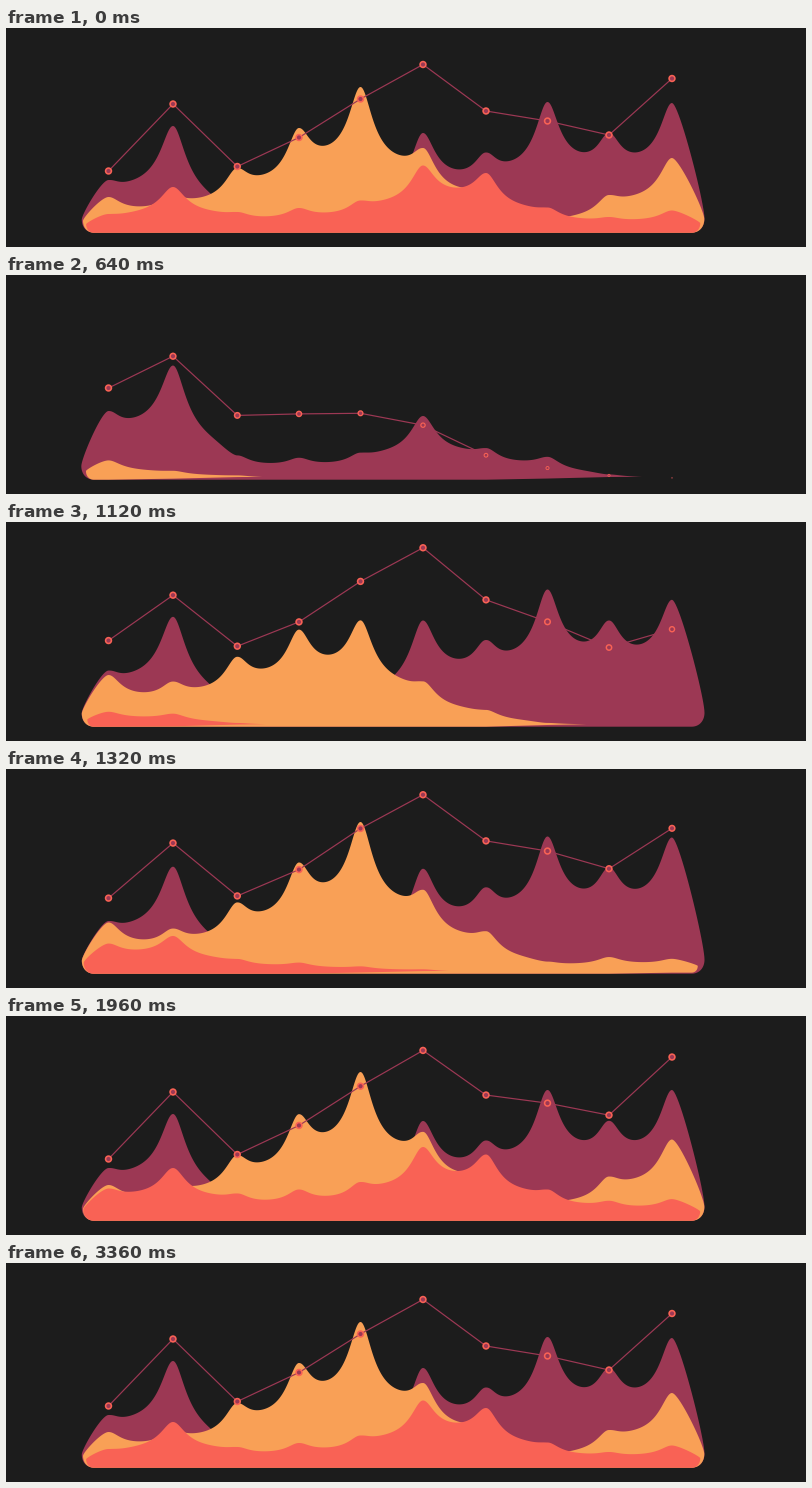
Write a matplotlib script that moves like this. It is 800x219 px and loops after 4360 ms.

```python
import numpy as np
import matplotlib.pyplot as plt
from matplotlib.animation import FuncAnimation
from matplotlib.patches import Circle, Polygon

W, H, DPI = 800, 219, 100
STEP, LOOP = 40, 4360
BASE = 203
BG, PLUM, ORANGE, CORAL = "#1c1c1c", "#9c3854", "#f9a056", "#f96255"
PX = 72 / DPI

X = np.array([102.5, 167, 231.3, 293, 354.5, 417, 480, 541.5, 603, 666])
K = np.arange(len(X))


def ease(u):
    u = np.clip(u, 0, 1)
    return u * u * (3 - 2 * u)


class Track:
    """Data points that rise one after another, overshoot and settle."""

    def __init__(self, rest, bump, start, length, hold, settle):
        self.rest, self.bump = np.array(rest, float), bump
        self.start, self.length = start, length
        self.back = start + length + hold
        self.settle = settle

    def at(self, t):
        rise = ease((t - self.start) / self.length)
        extra = self.bump * (1 - ease((t - self.back) / self.settle))
        return rise, BASE - (BASE - self.rest + extra) * rise


AREA_BUMP = 6.5 + 9.5 * 0.1 ** K
AREAS = [
    (PLUM, Track([152, 98, 187, 189, 179, 105, 124.5, 74, 105, 75],
                 AREA_BUMP, 20 + 70 * K, 380 + 20 * K, 300, 600)),
    (ORANGE, Track([169, 167, 140, 100, 59, 120, 156, 191, 167, 130],
                   AREA_BUMP, 400 + 85 * K, 600, 250, 700)),
    (CORAL, Track([186, 159, 184, 180, 172.5, 137.5, 145, 179.5, 189, 182.5],
                  AREA_BUMP, 860 + 78 * K, 600, 300, 800)),
]
DOTS = Track([143, 76, 138.5, 109.5, 71, 36.5, 83, 93, 107, 50.5],
             11 + 19 * (-0.42) ** K, 40 + 65 * K, 600 + 32 * K, 260, 800)


def kernel(s):
    """Sharp peak with a wide skirt that ends at the neighbouring point."""
    s = np.clip(np.abs(s), 0, 1)
    return (1 - s**6) ** 2 / np.sqrt(1 + (s / 0.195) ** 2)


def bezier(p0, p1, p2, p3, n=24):
    u = np.linspace(0, 1, n)[:, None]
    p0, p1, p2, p3 = map(np.array, (p0, p1, p2, p3))
    return ((1 - u)**3 * p0 + 3 * u * (1 - u)**2 * p1
            + 3 * u * u * (1 - u) * p2 + u**3 * p3)


TOP_X = np.linspace(X[0], X[-1], 1100)
SLOT = np.interp(TOP_X, X, K)
WEIGHTS = kernel(SLOT[:, None] - K)


def side(edge, x, y, floor, sign):
    """Outline from the floor round the outer corner up to an end point."""
    bulge = 1 - np.exp(-max(floor - 2 - y, 0) / 18)
    tip = edge + sign * 13 * bulge
    tip_y = floor - 14 * bulge
    y = min(y, tip_y)
    corner = bezier((edge, floor), (edge + sign * 8 * bulge, floor),
                    (tip, tip_y + 8 * bulge), (tip, tip_y))
    climb = bezier((tip, tip_y), (tip, tip_y - 0.14 * (tip_y - y)),
                   (x + sign * 7, y), (x, y))
    return np.vstack([corner, climb])


def outline(track, t):
    rise, y = track.at(t)
    floor = 201.6 + 3.1 * np.interp(TOP_X, X, np.clip(rise * 4, 0, 1))
    top = np.minimum(BASE - WEIGHTS @ (BASE - y), floor)
    left = side(88, X[0], top[0], floor[0], -1)
    right = side(685.5, X[-1], top[-1], floor[-1], 1)[::-1]
    return np.vstack([left, np.c_[TOP_X, top], right,
                      np.c_[TOP_X, floor][::-1]])


fig = plt.figure(figsize=(W / DPI, H / DPI), dpi=DPI, facecolor=BG)
ax = fig.add_axes([0, 0, 1, 1])
ax.set_xlim(0, W)
ax.set_ylim(H, 0)
ax.axis("off")

shapes = [ax.add_patch(Polygon([(0, 0), (1, 0), (0, 1)], fc=color, lw=0,
                               zorder=z))
          for z, (color, _) in enumerate(AREAS, 1)]
line, = ax.plot([], [], color=PLUM, lw=1.2 * PX, zorder=4)
dots = [ax.add_patch(Circle((x, BASE), 1, fc=PLUM, ec=CORAL, zorder=5))
        for x in X]


def draw(i):
    t = i * STEP if i else LOOP
    for shape, (_, track) in zip(shapes, AREAS):
        shape.set_xy(outline(track, t))

    rise, y = DOTS.at(t)
    reach = X[0] + (X[-1] - X[0]) * min(max((t - 40) / 800, 0), 1)
    xs = np.append(X[X < reach], reach)
    line.set_data(xs, np.interp(xs, X, y))
    for dot, x, cy, p in zip(dots, X, y, rise):
        size = p ** 0.25
        dot.center = (x, cy)
        dot.set_radius(2.9 * size)
        dot.set_linewidth(1.6 * size * PX)
        dot.set_visible(p > 0)
    return [*shapes, line, *dots]


anim = FuncAnimation(fig, draw, frames=LOOP // STEP, interval=STEP,
                     init_func=lambda: draw(0), repeat=True, repeat_delay=0)
plt.show()
```
